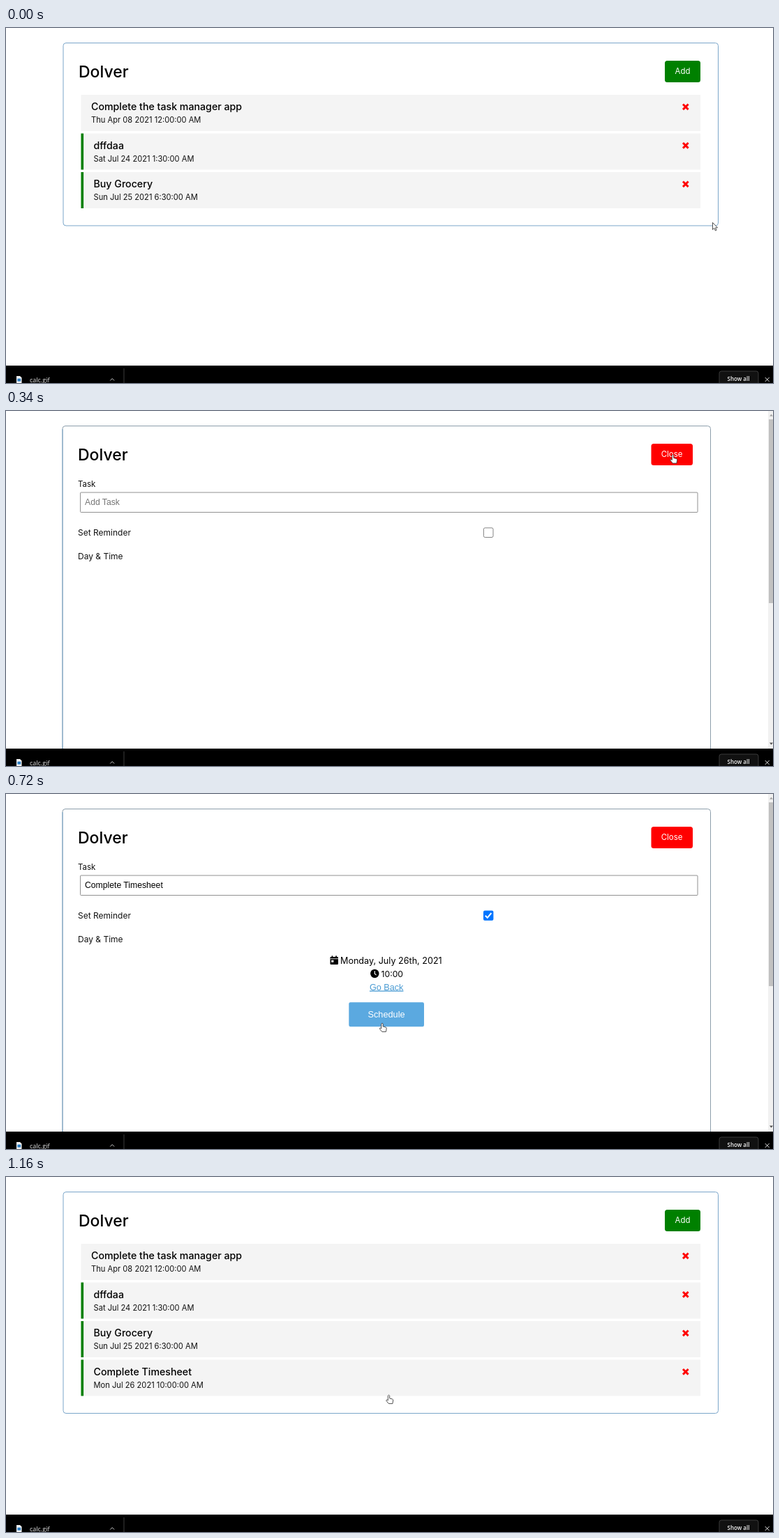
These frames come from a looping animation (1099 by 510 pixels, 1.76 s). An HTML page:

```html
<!DOCTYPE html>
<html lang="en">
<head>
<meta charset="utf-8">
<title>Task list</title>
<style>
html, body { margin: 0; width: 100%; height: 100%; overflow: hidden; background: #fff; }
svg { display: block; }
text { font-family: Inter, sans-serif; white-space: pre; }
.arial { font-family: "Liberation Sans", Arial, sans-serif; }
.bar { font-family: "Open Sans", sans-serif; }
.bold { font-weight: 500; }
.link { text-decoration: underline; }
.mid { text-anchor: middle; }
</style>
</head>
<body>
<svg id="stage" width="1099" height="510" viewBox="0 0 1099 510"></svg>
<script>
const LOOP = 1760, BLUE = '#7ba6ca', SKY = '#4a9bd3';
const stage = document.getElementById('stage');

const rect = (x, y, w, h, fill, extra = '') =>
  `<rect x="${x}" y="${y}" width="${w}" height="${h}" fill="${fill}" ${extra}/>`;
const text = (x, y, size, str, fill = '#000', cls = '') =>
  `<text x="${x}" y="${y}" font-size="${size}" fill="${fill}" class="${cls}">${str}</text>`;
const path = (d, fill, extra = '') => `<path d="${d}" fill="${fill}" ${extra}/>`;
const line = (d, color, width) => path(d, 'none', `stroke="${color}" stroke-width="${width}"`);
const frame = (color, r = 0, width = 1) => `stroke="${color}" stroke-width="${width}" rx="${r}"`;

const tasks = [
  ['Complete the task manager app', 'Thu Apr 08 2021 12:00:00 AM'],
  ['dffdaa', 'Sat Jul 24 2021 1:30:00 AM', true],
  ['Buy Grocery', 'Sun Jul 25 2021 6:30:00 AM', true],
  ['Complete Timesheet', 'Mon Jul 26 2021 10:00:00 AM', true]
];

const heading = x => text(x, 71, 23, 'Dolver', '#000', 'bold');

function taskRow([name, date, reminder], i, red) {
  const y = 96 + i * 55.5, x = reminder ? 125.5 : 122;
  return rect(107.5, y, 887.5, 52, '#f4f4f4') +
    (reminder ? rect(107.5, y, 3.6, 52, '#008000') : '') +
    text(x, y + 22.3, 14.2, name, '#000', 'bold') +
    text(x, y + 40, 11.15, date, '#111') +
    line(`M970 ${y + 13.5}l7.6 7.6m0 -7.6l-7.6 7.6`, red, 2.9);
}

function listScreen({ count, click }) {
  const red = click ? '#e00000' : '#f00';
  const button = click ? rect(945, 47.5, 49.5, 30, '#008000', 'rx="3.5"')
                       : rect(944, 47, 51, 31, '#008000', 'rx="3.5"');
  return rect(82, 21.5, 938.5, 96 + count * 55.5, '#fff', frame(BLUE, 4)) +
    heading(104) + button +
    text(969.5, 66.3, 11.4, 'Add', '#fff', 'mid') +
    tasks.slice(0, count).map((t, i) => taskRow(t, i, red)).join('');
}

function timeGrid(hover) {
  let cells = '';
  for (let i = 0; i < 15; i++) {
    const x = 407 + i % 3 * 92.4, y = 271.5 + Math.floor(i / 3) * 52.1;
    const min = 540 + 15 * i, pad = n => String(n).padStart(2, '0');
    const color = hover && i === 4 ? SKY : '#111';
    cells += rect(x, y, 79.5, 39, '#fff', frame(color, 0, 0.9)) +
      text(x + 39.7, y + 24, 12.5, `${pad(Math.floor(min / 60))}:${pad(min % 60)}`, color, 'mid');
  }
  return `<clipPath id="view"><rect x="396" y="281" width="300" height="204"/></clipPath>
    <g clip-path="url(#view)">${cells}</g>` +
    rect(396, 280, 300, 1, '#f1f1f1') + rect(684, 281, 12, 204, '#f1f1f1') +
    rect(685.3, 382, 9.4, 35, '#c1c1c1') + path('M687 289.5h6l-3 -3z', '#505050');
}

function scheduleBox() {
  return `<circle cx="528.3" cy="258" r="6.2"/>` + line('M528.3 254.3v4l2.3 1.8', '#fff', 1.2) +
    text(537.5, 262.5, 12.2, '10:00') +
    rect(491.3, 299.3, 107.7, 35, '#5ba9e0', 'rx="2.2"') +
    text(545, 320.6, 12.75, 'Schedule', '#fff', 'arial mid');
}

function picker({ view, click }) {
  if (!view) return '';
  return rect(464.5, 234, 11.5, 11, '#000', 'rx="1.2"') +
    rect(466.6, 232.4, 1.7, 3, '#000') + rect(472.2, 232.4, 1.7, 3, '#000') +
    line('M464.5 236.7h11.5', '#fff', 0.8) + rect(466.2, 238.7, 3.2, 3, '#fff') +
    text(479, 243.6, 12.6, 'Monday, July 26th, 2021') +
    text(545.2, view === 'times' ? 262.4 : 281.5, 12.65, 'Go Back', SKY, 'arial link mid') +
    (view === 'times' ? timeGrid(click) : scheduleBox());
}

function formScreen(s) {
  const field = s.filled ? ['Complete Timesheet', '#000'] : ['Add Task', '#757575'];
  const box = s.filled
    ? rect(684, 167.4, 14.4, 14.4, '#0075ff', 'rx="2"') + line('M686.8 174.8l3 3l5.6 -6.8', '#fff', 2)
    : rect(684.4, 167.9, 13.6, 13.6, '#fff', frame('#767676', 2, 0.9));
  return rect(81, 21.5, 928.5, 500, '#fff', frame('#8c9eab', 4)) +
    line('M81 26v460', BLUE, 1) + heading(103) +
    rect(924.5, 47, 59.5, 31, '#f00', 'rx="3.5"') +
    text(954, 66.3, 11.4, 'Close', '#fff', 'mid') +
    text(103, 108.6, 11.5, 'Task', '#111') +
    rect(106.5, 117, 884.5, 28.5, '#fff', frame('#858585', 1, 0.9)) +
    text(113, 135.4, 12.2, ...field, 'arial') +
    text(103, 178.5, 12, 'Set Reminder', '#111') + box +
    text(103, 212.5, 12, 'Day &amp; Time', '#111') + picker(s) +
    rect(1092, 0, 7, 485, '#f1f1f1') + rect(1093, 12, 6, 264, '#c1c1c1') +
    path('M1094 7.5h5l-2.5 -3z', '#a3a3a3') + path('M1094 476.5h5l-2.5 3z', '#505050');
}

const downloads = rect(0, 485, 1099, 25, '#000') +
  path('M15 500h5l2.5 2.5v8h-7.5z', '#f4f4f4') + rect(16.3, 503.6, 4.8, 4, '#2d7fc4') +
  text(34, 508.8, 9, 'calc.gif', '#e8e8e8', 'bar') +
  line('M149.3 506.5l2.9 -2.9l2.9 2.9', '#ccc', 1) + line('M169 489v21', '#3c3c3c', 1) +
  rect(1022, 493, 56, 24, '#111', frame('#3a3a3a', 3)) +
  `<g font-weight="600">${text(1049.5, 507.2, 8, 'Show all', '#f4f4f4', 'bar mid')}</g>` +
  line('M1087.7 502l6 6m0 -6l-6 6', '#ddd', 1);

const HAND = 'M-1.2 1.2Q0 -.8 1.2 1.2V5L5 6Q6.3 6.5 6.2 8L5.4 12.6H-.2L-3.6 8.4Q-3.8 6.6 -2 7.3L-1.2 8Z';
const ARROW = 'M0 0V10.2L2.3 8L3.9 11.6L5.5 10.9L4 7.4H7Z';

function pointer({ x, y, hand, click }) {
  const halo = click ? '<circle cy="1" r="9" fill="#ff0" opacity=".6"/>' : '';
  return `<g transform="translate(${x} ${y})">${halo}` +
    path(hand ? HAND : ARROW, '#fff', 'stroke="#333" stroke-width=".85" stroke-linejoin="round"') + '</g>';
}

const list = { screen: listScreen, count: 3 };
const blank = { screen: formScreen, hand: true };
const times = { screen: formScreen, view: 'times', filled: true };
const plan = { screen: formScreen, view: 'plan', filled: true, hand: true };
const steps = [
  { ...list, at: 0, x: 1012.5, y: 279.5 },
  { ...list, at: 70, x: 1003, y: 237 },
  { ...list, at: 140, x: 981, y: 160, hand: true },
  { ...list, at: 210, x: 963, y: 88 },
  { ...list, at: 280, x: 955.5, y: 62.5, hand: true, click: true },
  { ...blank, at: 340, x: 955.5, y: 62.5 },
  { ...times, at: 390, x: 578.5, y: 351.8 },
  { ...times, at: 460, x: 556, y: 345, hand: true },
  { ...times, at: 530, x: 537, y: 341, hand: true },
  { ...times, at: 590, x: 533, y: 340, hand: true, click: true },
  { ...plan, at: 720, x: 539, y: 329 },
  { ...plan, at: 850, x: 548.5, y: 313 },
  { ...plan, at: 990, x: 548.5, y: 313, click: true },
  { ...plan, at: 1090, x: 548.5, y: 313, filled: false },
  { ...list, at: 1160, x: 548.5, y: 313, count: 4, hand: true }
];

let shown;
function tick() {
  const t = performance.now() % LOOP;
  const step = steps.findLast(s => s.at <= t);
  if (step !== shown) {
    shown = step;
    stage.innerHTML = step.screen(step) + downloads + pointer(step);
  }
  requestAnimationFrame(tick);
}
tick();
</script>
</body>
</html>
```
